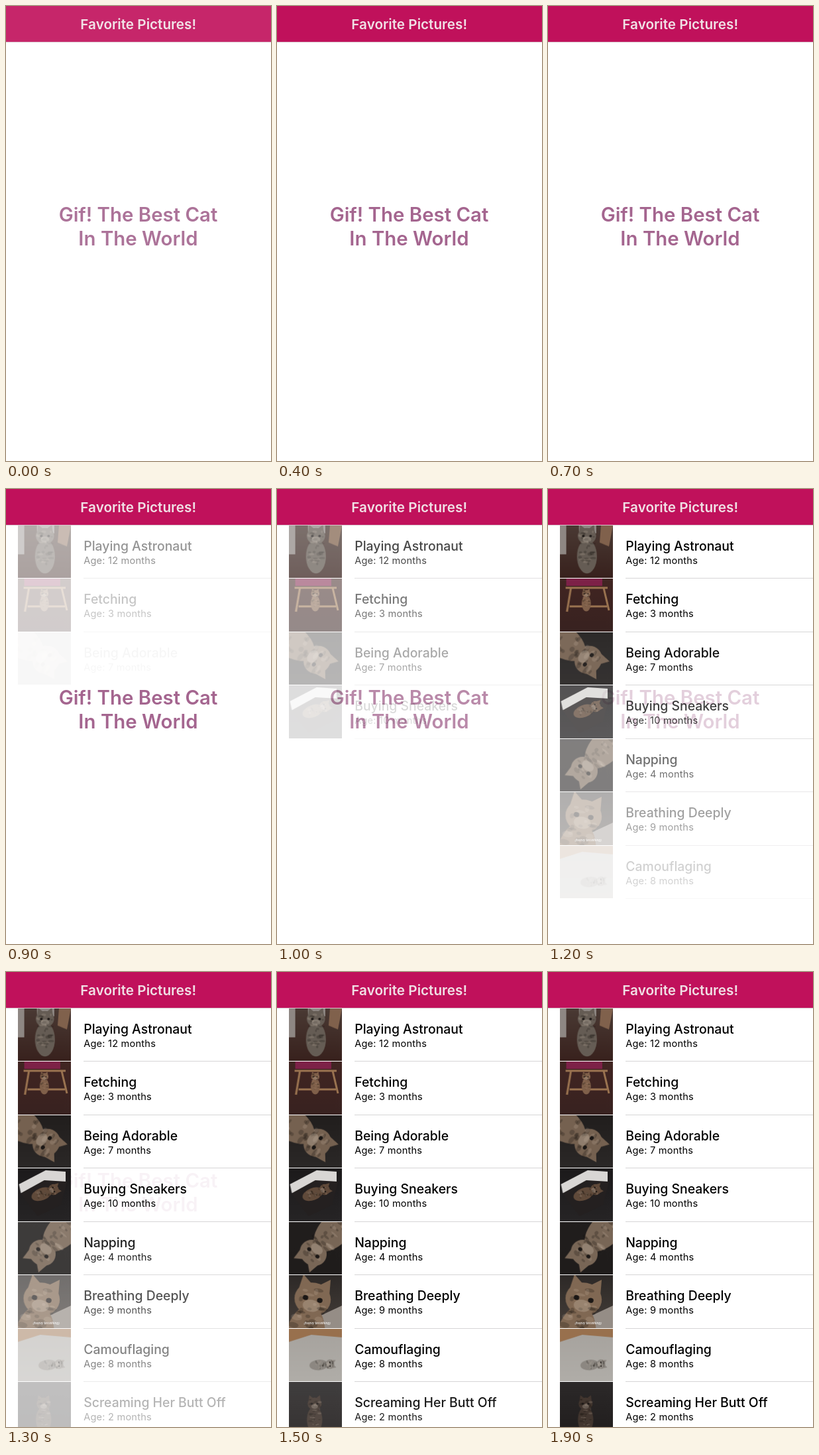
Write an HTML page with a canvas that moves like this. It is 400 by 686 pixels and loops after 2000 ms.

```html
<!DOCTYPE html>
<html lang="en">
<head>
<meta charset="utf-8">
<title>Favorite Pictures!</title>
<style>
  html, body { margin: 0; width: 100%; height: 100%; overflow: hidden; background: #fff; }
  canvas { display: block; }
</style>
</head>
<body>
<canvas id="stage" width="400" height="686"></canvas>
<script>
const W = 400, H = 686, LOOP = 2000, STEP = 100;
const ROW = 80.5, HEADER = 54, THUMB = 80;
const SANS = 'Inter, Roboto, sans-serif';
const ctx = document.getElementById('stage').getContext('2d');
const clamp = v => Math.max(0, Math.min(1, v));

function seeded(seed) {
  let s = seed * 7919 + 17;
  return () => (s = s * 16807 % 2147483647) / 2147483647;
}

function poly(g, color, ...p) {
  g.fillStyle = color;
  g.beginPath();
  for (let i = 0; i < p.length; i += 2) g.lineTo(p[i], p[i + 1]);
  g.fill();
}

function oval(g, color, x, y, rx, ry) {
  g.fillStyle = color;
  g.beginPath();
  g.ellipse(x, y, rx, ry, 0, 0, 7);
  g.fill();
}

// Simple cat: head at x, y with radius r; the body trails along the turned axis
function drawCat(g, { x, y, r, turn, fur }, rand) {
  g.save();
  g.translate(x, y);
  g.rotate(turn);
  g.scale(r, r);
  oval(g, fur, 0, 2.4, 1.15, 2);
  for (const side of [-1, 1]) poly(g, fur, side * 0.95, 0, side * 0.8, -1.3, side * 0.15, -0.8);
  oval(g, fur, 0, 0, 1.05, 0.95);
  // Tabby coat: dark patches and a few light ones
  for (let i = 0; i < 36; i++) {
    const color = i % 3 ? 'rgba(20,14,12,.25)' : 'rgba(225,205,185,.16)';
    oval(g, color, (rand() - 0.5) * 1.6, rand() * 4 - 0.7, 0.08 + rand() * 0.28, 0.07 + rand() * 0.12);
  }
  oval(g, 'rgba(225,210,195,.25)', 0, 0.4, 0.5, 0.35);
  for (const side of [-1, 1]) oval(g, '#1b1715', side * 0.42, 0, 0.16, 0.14);
  g.restore();
}

function doorway(g) {
  g.fillStyle = '#8e8783';
  g.fillRect(0, 0, 10, 44);
  g.fillRect(29, 0, 26, 12);
  poly(g, '#80614c', 62, 0, 80, 0, 74, 32, 60, 26);
}

function stool(g) {
  g.fillStyle = '#7d2147';
  g.fillRect(10, 0, 54, 11);
  g.strokeStyle = '#9a7350';
  g.lineWidth = 3;
  g.stroke(new Path2D('M9 14H72M17 14L11 50M66 14L74 48M15 42H71'));
}

function shoebox(g) {
  poly(g, '#d8d6d4', 2, 24, 42, 3, 72, 5, 72, 20, 5, 38);
  poly(g, '#242020', 4, 38, 40, 18, 74, 20, 66, 55, 30, 72);
}

function pillow(g) {
  poly(g, '#958d86', 50, 60, 80, 46, 80, 80, 40, 80);
}

function caption(g) {
  g.fillStyle = '#f2f0ee';
  g.font = `italic 600 4.6px ${SANS}`;
  g.textAlign = 'center';
  g.fillText('(heavy breathing)', 43, 74);
}

function woodFloor(g) {
  poly(g, '#98704d', 0, 0, 80, 0, 80, 13, 34, 9, 0, 20);
}

const rows = [
  { name: 'Playing Astronaut', age: 12, wall: '#4a3a34', floor: '#38211d', behind: doorway,
    cat: { x: 41, y: 16, r: 13, turn: 0, fur: '#655c54' } },
  { name: 'Fetching', age: 3, wall: '#412522', floor: '#382220', behind: stool,
    cat: { x: 40, y: 23, r: 6, turn: 0, fur: '#80604a' } },
  { name: 'Being Adorable', age: 7, wall: '#211e1d', floor: '#2b2827',
    cat: { x: 43, y: 42, r: 21, turn: 2.2, fur: '#756150' } },
  { name: 'Buying Sneakers', age: 10, wall: '#1c1a1b', floor: '#262425', behind: shoebox,
    cat: { x: 54, y: 32, r: 8, turn: 1.2, fur: '#604a3a' } },
  { name: 'Napping', age: 4, wall: '#211e1d', floor: '#1f1c1b',
    cat: { x: 37, y: 47, r: 20, turn: -2.4, fur: '#786656' } },
  { name: 'Breathing Deeply', age: 9, wall: '#2d2927', floor: '#453e39', behind: pillow, front: caption,
    cat: { x: 36, y: 36, r: 26, turn: 0.2, fur: '#806853' } },
  { name: 'Camouflaging', age: 8, wall: '#a6a29d', floor: '#b0ada8', behind: woodFloor,
    cat: { x: 62, y: 54, r: 7, turn: 1.5, fur: '#8c8781' } },
  { name: 'Screaming Her Butt Off', age: 2, wall: '#2c2929', floor: '#201d1d',
    cat: { x: 39, y: 33, r: 10, turn: 0, fur: '#42362f' } }
];

function makeThumb({ wall, floor, cat, behind, front }, seed) {
  const c = document.createElement('canvas');
  c.width = c.height = THUMB;
  const g = c.getContext('2d');
  const shade = g.createLinearGradient(0, 0, 0, THUMB);
  shade.addColorStop(0, wall);
  shade.addColorStop(1, floor);
  g.fillStyle = shade;
  g.fillRect(0, 0, THUMB, THUMB);
  behind?.(g);
  drawCat(g, cat, seeded(seed + 1));
  front?.(g);
  return c;
}

const thumbs = rows.map(makeThumb);

function label(str, x, y, font, color, align = 'left', spacing = 0) {
  ctx.font = `${font} ${SANS}`;
  ctx.letterSpacing = spacing + 'px';
  ctx.textAlign = align;
  ctx.fillStyle = color;
  ctx.fillText(str, x, y);
}

function drawTitle(t) {
  ctx.globalAlpha = clamp(1 - (t - 900) / 435);
  label('Gif! The Best Cat', 199.5, 324.7, '600 29.4px', '#a4658f', 'center');
  label('In The World', 199.5, 360.7, '600 29.4px', '#a4658f', 'center');
}

// Rows fade in one after another
function drawRow({ name, age }, i, t) {
  ctx.globalAlpha = clamp((t - 762 - i * 63) / 330);
  if (!ctx.globalAlpha) return;
  const dy = i * ROW;
  const top = Math.round(53.5 + dy) + 1, rule = Math.round(134 + dy);
  ctx.drawImage(thumbs[i], 17.5, top, THUMB + 0.5, rule - top);
  ctx.fillStyle = '#d6d5d6';
  ctx.fillRect(117, rule, W - 117, 1);
  label(name, 117.2, 92.5 + dy, '500 19.4px', '#000');
  label(`Age: ${age} months`, 117.2, 112.5 + dy, '400 14.6px', '#000', 'left', 0.2);
}

function drawHeader() {
  ctx.globalAlpha = 1;
  ctx.fillStyle = '#c0115b';
  ctx.fillRect(0, 0, W, HEADER);
  ctx.fillStyle = '#d8c3cc';
  ctx.fillRect(0, HEADER, W, 1);
  label('Favorite Pictures!', 199.7, 34.5, '600 20.7px', '#f0e0e5', 'center');
}

function render(now) {
  const t = Math.floor(now / STEP) * STEP % LOOP;
  ctx.globalAlpha = 1;
  ctx.fillStyle = '#fff';
  ctx.fillRect(0, 0, W, H);
  drawTitle(t);
  rows.forEach((row, i) => drawRow(row, i, t));
  drawHeader();
  // White veil lifting at the start of the loop
  ctx.globalAlpha = 0.09 * clamp(1 - t / 400) ** 2;
  ctx.fillStyle = '#fff';
  ctx.fillRect(0, 0, W, H);
  requestAnimationFrame(render);
}
requestAnimationFrame(render);
</script>
</body>
</html>
```
